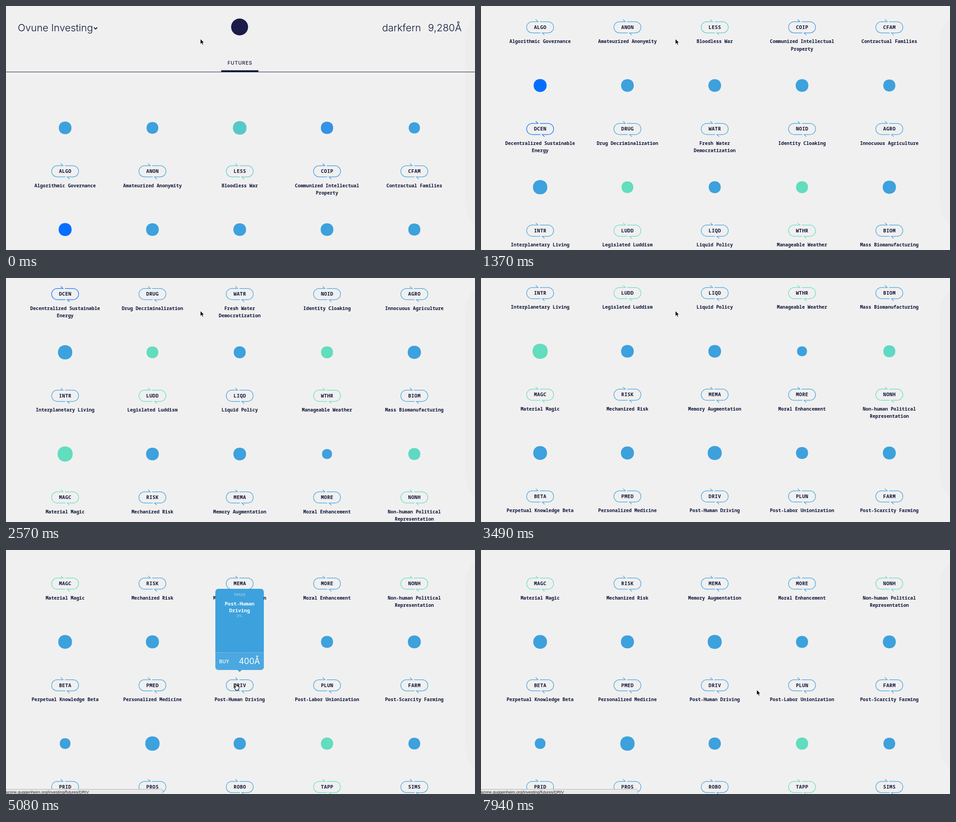
These frames come from a looping animation (1035 px wide and 541 px high, 8000 ms). An HTML page:

```html
<!DOCTYPE html>
<html lang="en">
<head>
<meta charset="utf-8">
<title>Futures</title>
<style>
  html, body { margin: 0; width: 100%; height: 100%; overflow: hidden; background: #f0f0f0; }
  svg { display: block; width: 1035px; height: 541px; }
  text { fill: #10163a; font-family: Inter, "Open Sans", sans-serif; }
  .mid { text-anchor: middle; }
  .end { text-anchor: end; }
  .mono { font-family: "Noto Sans Mono", "DejaVu Sans Mono", monospace; }
  .head { font-size: 22px; font-weight: 300; }
  .code { font-size: 10.8px; font-weight: 700; letter-spacing: .4px; }
  .label { font-size: 10.27px; font-weight: 600; }
  .tip text { fill: #fff; }
  .small { font-size: 8px; opacity: .6; }
  .title { font-size: 10.9px; font-weight: 700; }
  .url { font: 9px "Liberation Sans", Arial, sans-serif; fill: #222; }
</style>
</head>
<body>
<svg viewBox="0 0 1035 541">
  <rect width="1035" height="541" fill="#f0f0f0"/>
  <rect x="1013" y="13" width="120" height="487" rx="50" ry="65" fill="#ededed"/>

  <g id="page">
    <text class="head" x="26" y="56">Ovune Investing</text>
    <path d="M194 47.5l3.7 3.7 3.7-3.7" fill="none" stroke="#10163a" stroke-width="1.9"/>
    <circle cx="515.5" cy="46.5" r="18.7" fill="#1c1c4a"/>
    <text class="head end" x="916" y="56">darkfern</text>
    <text class="head end" x="1005.5" y="56">9,280Å</text>
    <text class="mid" x="516.3" y="129.5" font-size="10.6" font-weight="500" letter-spacing=".8">FUTURES</text>
    <path d="M0 146.3H1035" stroke="#10163a" stroke-width="1.1"/>
    <rect x="475" y="142.5" width="82" height="4" fill="#10163a"/>
    <g id="grid"></g>
  </g>

  <g id="tip" class="tip">
    <rect x="462" y="86" width="107" height="180" rx="7" fill="#3da1dd"/>
    <path d="M462 227H569V259a7 7 0 0 1-7 7H469a7 7 0 0 1-7-7Z" fill="#4ba8e0"/>
    <path d="M462 227.5H569" stroke="#74bce7"/>
    <path d="M510.5 265.8h10l-5 4.8z" fill="#3da1dd"/>
    <text class="mid small" x="515.5" y="101.5">TRADE</text>
    <text class="mid mono title" x="515.5" y="123.3">Post-Human</text>
    <text class="mid mono title" x="515.5" y="137.7">Driving</text>
    <text class="mid small" x="515.5" y="148.6">0%</text>
    <text x="470.5" y="250.5" font-size="10.5" font-weight="500">BUY</text>
    <text class="end" x="560.5" y="253" font-size="18">400Å</text>
  </g>

  <g id="status">
    <path id="statusBox" d="M-1 530.5H343a3 3 0 0 1 3 3V542H-1Z" fill="#e9e9e9" stroke="#b4b4b4"/>
    <text class="url" x="-1" y="539.6">azone.guggenheim.org/investing/futures/DRIV</text>
  </g>

  <g id="cursor">
    <path id="arrow" d="M0 0V11.6L2.7 9.1 4.6 13.3 6.5 12.5 4.7 8.4H8.2Z" fill="#000" stroke="#fff" stroke-width=".8"/>
    <path id="hand" d="M-1.2 1C-1.2-.5 1-.5 1.2 1L1.8 4.6C2.2 3.5 3.6 3.6 3.8 4.8 4.5 4 5.6 4.3 5.7 5.4 6.5 5 7.2 5.6 7.1 6.6V9.5C7 11 6.2 11.6 6.1 13.6H-.2C-.4 11.8-2.6 10-3.8 7.6-4.2 6.4-2.8 5.9-2 6.8L-.5 8.2Z" fill="#fff" stroke="#000" stroke-width="1.1" stroke-linejoin="round"/>
  </g>
</svg>

<script>
const LOOP = 8000;
const BLUE = "#3da1dd", GREEN = "#62ddbd";
const TINTS = {
  LESS: "#58c8c8", COIP: "#3493e6", DCEN: "#056eff", NONH: "#5fd9c2",
  LUDD: GREEN, WTHR: GREEN, MAGC: GREEN, TAPP: GREEN
};

// code, blob radius, label ("/" breaks the line)
const FUTURES = `
ALGO 14 Algorithmic Governance
ANON 13 Amateurized Anonymity
LESS 15 Bloodless War
COIP 13.6 Communized Intellectual/Property
CFAM 12.4 Contractual Families
DCEN 14.3 Decentralized Sustainable/Energy
DRUG 14 Drug Decriminalization
WATR 14 Fresh Water/Democratization
NOID 14 Identity Cloaking
AGRO 13.3 Innocuous Agriculture
INTR 15.8 Interplanetary Living
LUDD 13 Legislated Luddism
LIQD 13.2 Liquid Policy
WTHR 13.2 Manageable Weather
BIOM 14.6 Mass Biomanufacturing
MAGC 16.7 Material Magic
RISK 14 Mechanized Risk
MEMA 14 Memory Augmentation
MORE 11 Moral Enhancement
NONH 13.3 Non-human Political/Representation
BETA 15.2 Perpetual Knowledge Beta
PMED 14.4 Personalized Medicine
DRIV 15.5 Post-Human Driving
PLUN 13.3 Post-Labor Unionization
FARM 14.3 Post-Scarcity Farming
PRID 11.8
PROS 15.8
ROBO 13.5
TAPP 13.5
SIMS 13`.trim().split("\n");

const $ = id => document.getElementById(id);
const clamp = v => Math.max(0, Math.min(1, v));
const ramp = (t, from, to) => clamp((t - from) / (to - from));
const smooth = p => p * p * (3 - 2 * p);

// slightly squared circle
function blob(r) {
  const k = r * 0.6;
  return `M0 ${-r}C${k} ${-r} ${r} ${-k} ${r} 0S${k} ${r} 0 ${r}S${-r} ${k} ${-r} 0S${-k} ${-r} 0 ${-r}Z`;
}

const HALF_PILL = "M-9.7-17.2L-4.6-12.4H-17.4A12.4 12.4 0 0 0-17.4 12.4H.6";

function futureMarkup(row, i) {
  const [, code, radius, label] = row.match(/^(\S+) (\S+) ?(.*)$/);
  const x = 130.5 + (i % 5) * 192.65;
  const y = 366.5 + Math.floor(i / 5) * 225.45;
  const tint = TINTS[code] || BLUE;
  const lines = label.split("/").map((line, n) =>
    `<text class="mid mono label" y="${35 + n * 16.5}">${line}</text>`).join("");
  return `<g transform="translate(${x} ${y})">
    <path d="${blob(+radius)}" transform="translate(0 -96.3)" fill="${tint}"/>
    <g fill="none" stroke="${tint}" stroke-width="1.25">
      <path d="${HALF_PILL}"/><path d="${HALF_PILL}" transform="rotate(180)"/>
    </g>
    <text class="mid mono code" x=".2" y="3.6">${code}</text>${lines}</g>`;
}
$("grid").innerHTML = FUTURES.map(futureMarkup).join("");

const SCROLL = [[400, 0], [1370, 319.3], [2570, 556.3], [3490, 784], [3660, 837], [3840, 895], [4200, 968.3]];

function scrollAt(t) {
  if (t < 570) return 0;
  // the page is redrawn only a few times a second while scrolling
  const starts = [570, 1370, 1540, 1690, 2570, 2750, 3490, 3660, 3840, 4200];
  const steps = [200, 170, 150, 176, 180, 185, 170, 180, 180, LOOP];
  const n = starts.filter(s => s <= t).length - 1;
  const at = starts[n] + Math.floor((t - starts[n]) / steps[n]) * steps[n];
  for (let i = 1; i < SCROLL.length; i++) {
    const [t0, y0] = SCROLL[i - 1], [t1, y1] = SCROLL[i];
    if (at <= t1) return y0 + (y1 - y0) * ramp(at, t0, t1);
  }
  return SCROLL[SCROLL.length - 1][1];
}

// [start, end, from, control, to]
const MOVES = [
  [4300, 4880, [429, 73], [470, 210], [507, 297]],
  [5700, 6330, [507, 297], [590, 242], [506.5, 249.5]],
  [7350, 7940, [506.5, 249.5], [510, 318], [608.5, 310]]
];

function cursorAt(t) {
  const move = MOVES.filter(m => m[0] <= t).pop() || MOVES[0];
  const [start, end, a, b, c] = move;
  const p = smooth(ramp(t, start, end)), q = 1 - p;
  return [0, 1].map(i => q * q * a[i] + 2 * p * q * b[i] + p * p * c[i]);
}

function statusAt(t) {
  if (t < 4800) return 0;
  if (t < 5740) return ramp(t, 4780, 4860);
  if (t < 7480) return 1 - ramp(t, 5850, 6370);
  return ramp(t, 7440, 7540);
}

function draw(t) {
  $("page").setAttribute("transform", `translate(0 ${-scrollAt(t)})`);

  $("tip").setAttribute("opacity", Math.min(ramp(t, 4860, 5080), 1 - ramp(t, 7620, 7780)));

  const status = statusAt(t);
  $("statusBox").setAttribute("opacity", status);
  // a trace of the address lingers after the bar fades
  const trace = t > 5740 && t < 7480 ? 0.06 : 0;
  $("status").lastElementChild.setAttribute("opacity", Math.max(status, trace));

  const [x, y] = cursorAt(t);
  const pointing = t > 4830 && x < 552;
  $("cursor").setAttribute("transform", `translate(${x} ${y})`);
  $("arrow").style.display = pointing ? "none" : "";
  $("hand").style.display = pointing ? "" : "none";
}

const began = performance.now();
function tick() {
  draw((performance.now() - began) % LOOP);
  requestAnimationFrame(tick);
}
tick();
</script>
</body>
</html>
```
